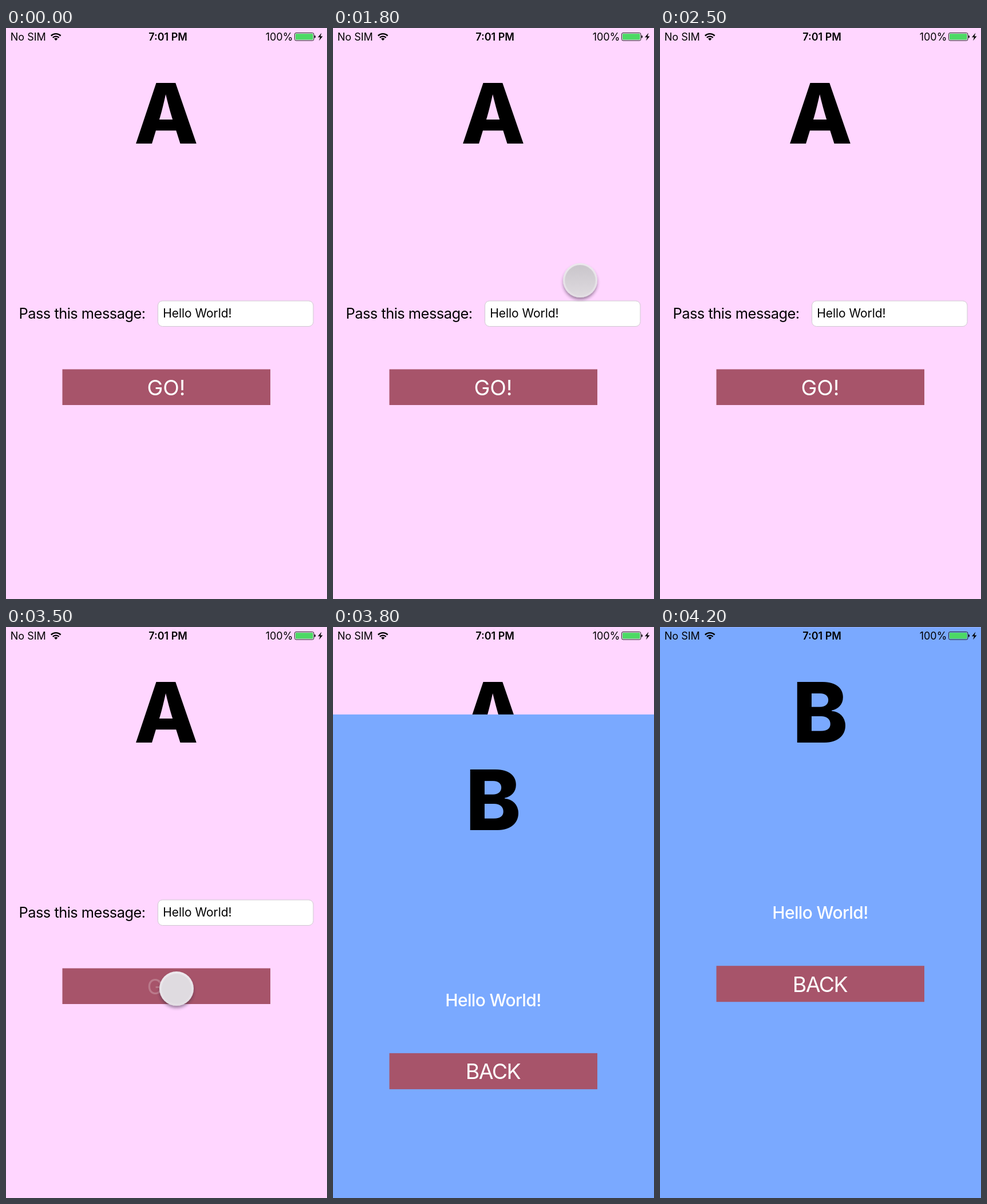
Animation, 561 px wide and 998 px high, one loop 4.3 s. Source, as an HTML page:

```html
<!DOCTYPE html>
<html lang="en">
<head>
<meta charset="utf-8">
<title>Pass a message</title>
<style>
  html, body { margin: 0; width: 100%; height: 100%; overflow: hidden; background: #ffd6ff; }
  svg { display: block; width: 561px; height: 998px; font-family: Inter, "Liberation Sans", sans-serif; }
  .mid { text-anchor: middle; }
  .title { font-size: 146px; font-weight: 800; }
  .button { font-size: 37.4px; fill: #fff; }
  .status { font-size: 18px; }
</style>
</head>
<body>
<svg viewBox="0 0 561 998">
  <defs>
    <linearGradient id="rim" x2="0" y2="1">
      <stop stop-color="#ece8ed"/><stop offset="1" stop-color="#e2dee3"/>
    </linearGradient>
    <linearGradient id="pressed" x2="0" y2="1">
      <stop stop-color="#b3afb5"/><stop offset="1" stop-color="#dedade"/>
    </linearGradient>
    <filter id="shadow" x="-30%" y="-30%" width="160%" height="170%">
      <feDropShadow dx="0" dy="4" stdDeviation="2.5" flood-color="#302038" flood-opacity=".45"/>
    </filter>
  </defs>

  <g>
    <rect width="561" height="998" fill="#ffd6ff"/>
    <text class="title mid" x="280" y="202">A</text>
    <text x="22.5" y="508" font-size="25.4" letter-spacing="-.02em">Pass this message:</text>
    <rect x="265.5" y="477" width="271.5" height="44.5" rx="8" fill="#fff" stroke="#cfc8d0"/>
    <text x="274.2" y="506" font-size="20.9">Hello World!</text>
    <rect x="98.5" y="596.5" width="363.5" height="62.5" fill="#a7546a"/>
    <text id="go" class="button mid" x="280" y="641.5">GO!</text>
  </g>

  <g id="pageB">
    <rect width="561" height="998" fill="#7aa9ff"/>
    <text class="title mid" x="280" y="202">B</text>
    <text class="mid" x="280" y="510" font-size="29.9" font-weight="500" letter-spacing="-.02em" fill="#fff">Hello World!</text>
    <rect x="98.5" y="592" width="363.5" height="63" fill="#a7546a"/>
    <text class="button mid" x="279.5" y="637.5" letter-spacing="-.04em">BACK</text>
  </g>

  <g id="puck">
    <circle r="30" fill="url(#rim)" filter="url(#shadow)"/>
    <circle r="26" fill="#dfdbe0"/>
    <circle id="dark" r="27" fill="url(#pressed)"/>
  </g>

  <g class="status">
    <text x="7.8" y="22">No SIM</text>
    <g fill="none" stroke="#000" stroke-width="2.4">
      <path d="M78.8 13.6a12 12 0 0 1 16.8 0M81.8 16.8a7.7 7.7 0 0 1 10.8 0"/>
    </g>
    <path d="M87.2 22l-3.1-3.2a4.4 4.4 0 0 1 6.2 0z"/>
    <text class="mid" x="283" y="22" font-weight="600">7:01 PM</text>
    <text x="453.7" y="22">100%</text>
    <rect x="504.5" y="8.5" width="33.5" height="13.5" rx="2.5" fill="none" stroke="#222"/>
    <rect x="506" y="10" width="30.5" height="10.5" rx="1" fill="#4cd964"/>
    <path d="M539 12.8q2 .4 2 2.5t-2 2.5zM551.5 8.5l-6.5 7.7h4l-2 6 6.5-7.7h-4z"/>
  </g>
</svg>
<script>
  const LOOP = 4300, STEP = 100, HEIGHT = 998;
  const [go, pageB, puck, dark] = ['go', 'pageB', 'puck', 'dark'].map(id => document.getElementById(id));
  const clamp = v => Math.min(1, Math.max(0, v));
  const ramp = (t, start, length) => clamp((t - start) / length);

  // Critically damped spring: 1 at rest below the stage, settling to 0.
  function spring(t) {
    const k = Math.max(0, t) * 0.0189;
    return (1 + k) * Math.exp(-k);
  }

  function draw(t) {
    const tapping = t >= 3500;
    const drag = ramp(t, 1600, 500);
    const x = tapping ? 298 : 418 + 35 * drag;
    const y = tapping ? 632 : 429 + 30 * drag;
    const touched = tapping || t >= 1600;
    puck.setAttribute('transform', `translate(${x} ${y})`);
    puck.setAttribute('opacity', touched ? 1 - ramp(t, tapping ? 3610 : 2300, 170) : 0);
    dark.setAttribute('opacity', tapping ? 0 : ramp(t, 1600, 400));
    go.setAttribute('opacity', tapping ? 0.22 : 1);
    pageB.setAttribute('transform', `translate(0 ${HEIGHT * spring(t - 3623)})`);
  }

  const origin = performance.now();
  function tick() {
    const t = (performance.now() - origin) % LOOP;
    draw(Math.floor(t / STEP) * STEP);
    requestAnimationFrame(tick);
  }
  tick();
</script>
</body>
</html>
```
